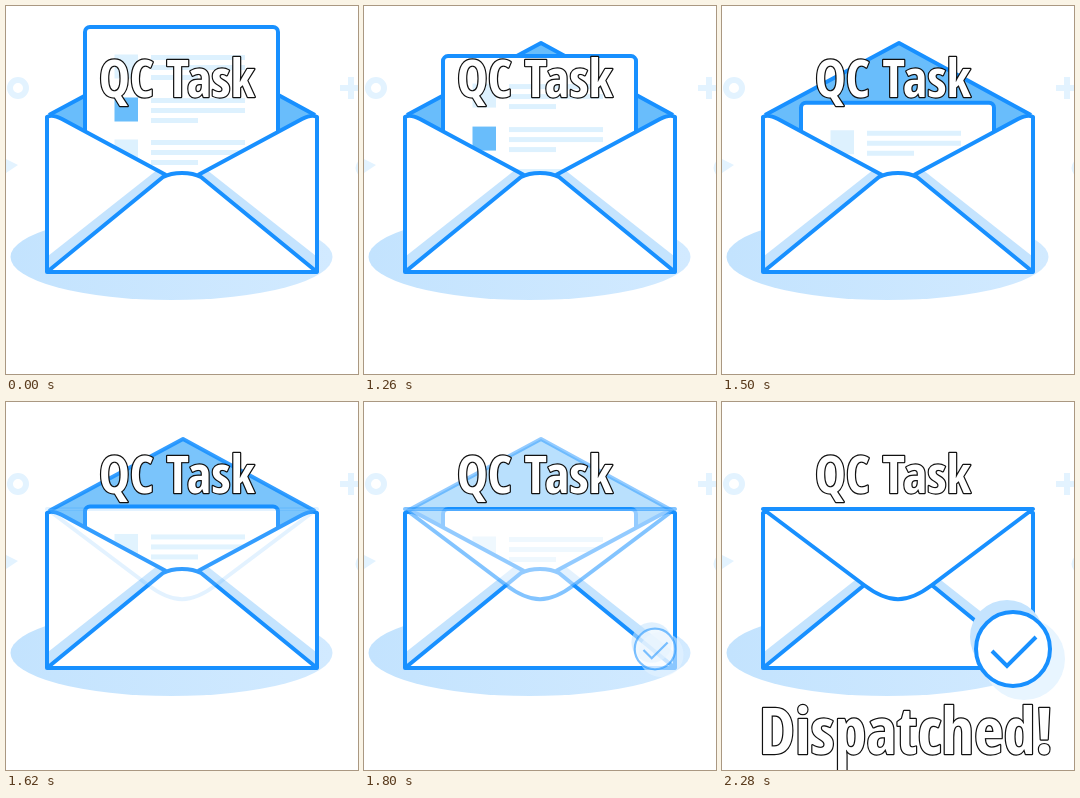
These frames come from a looping animation (352 px wide and 368 px high, 3.06 s). An HTML page with a canvas:

```html
<!DOCTYPE html>
<html lang="en">
<head>
<meta charset="utf-8">
<title>QC Task Dispatched!</title>
<style>
html, body { margin: 0; width: 100%; height: 100%; overflow: hidden; background: #fff; }
canvas { display: block; width: 352px; height: 368px; }
</style>
</head>
<body>
<canvas></canvas>
<script>
const W = 352, H = 368, LOOP = 3060, STEP = 60;
const BLUE = '#1890ff', SKY = '#69bdfb', BAND = '#c5e4fe', PALE = '#e3f3ff', LINE = '#ddf1fe';
const canvas = document.querySelector('canvas');
const ctx = canvas.getContext('2d');
const dpr = window.devicePixelRatio || 1;
canvas.width = W * dpr;
canvas.height = H * dpr;

const clamp = x => Math.min(1, Math.max(0, x));
const ramp = (t, start, length) => clamp((t - start) / length);

// cubic-bezier(.25, .1, .25, 1), solved by bisection
function ease(x) {
  const curve = (u, a, b) => 3 * u * (1 - u) ** 2 * a + 3 * u * u * (1 - u) * b + u ** 3;
  let lo = 0, hi = 1;
  for (let i = 0; i < 24; i++) {
    const mid = (lo + hi) / 2;
    if (curve(mid, .25, .25) < x) lo = mid; else hi = mid;
  }
  return curve(lo, .1, 1);
}

function shape(d, fill, stroke, width = 4) {
  const path = new Path2D(d);
  if (fill) { ctx.fillStyle = fill; ctx.fill(path); }
  if (stroke) { ctx.strokeStyle = stroke; ctx.lineWidth = width; ctx.stroke(path); }
}

function disc(x, y, r, fill, stroke, width = 4) {
  const path = new Path2D();
  path.arc(x, y, r, 0, 7);
  shape(path, fill, stroke, width);
}

function mirrored(draw) {
  draw();
  ctx.save();
  ctx.translate(W, 0);
  ctx.scale(-1, 1);
  draw();
  ctx.restore();
}

const font = (face, size) => `900 extra-condensed ${size}px "${face}", sans-serif`;

// Natural size of a text at 100px
function measure(face, text) {
  ctx.font = font(face, 100);
  return { face, width: ctx.measureText(text).width, cap: ctx.measureText('H').actualBoundingBoxAscent };
}

// Largest size that fits the box, in the most condensed face at hand
function caption(text, x, y, width, height) {
  const best = ['Noto Sans', 'Open Sans', 'Roboto', 'Open Sans Condensed', 'Roboto Condensed']
    .map(face => measure(face, text))
    .sort((a, b) => a.width / a.cap - b.width / b.cap)[0];
  const scale = Math.min(width / best.width, height / best.cap);
  const style = font(best.face, 100 * scale);
  const base = y + best.cap * scale / 2;
  return () => {
    ctx.font = style;
    ctx.textAlign = 'center';
    ctx.lineWidth = 2.4;
    ctx.strokeStyle = '#111';
    ctx.fillStyle = '#fff';
    ctx.strokeText(text, x, base);
    ctx.fillText(text, x, base);
  };
}

const title = caption('QC Task', 171, 72, 156, 40);
const done = caption('Dispatched!', 184, 329, 294, 48);

function backdrop() {
  disc(12, 82, 8, null, PALE, 6);
  disc(359, 162, 7, null, PALE, 5);
  shape('M334 82H356M345 71V93', null, PALE, 6);
  shape('M0 153L12 159L0 167Z', PALE);
  const glow = ctx.createLinearGradient(5, 0, 326, 0);
  glow.addColorStop(0, '#c3e3fe');
  glow.addColorStop(1, '#d2eaff');
  ctx.fillStyle = glow;
  ctx.beginPath();
  ctx.ellipse(165.5, 251, 161, 43, 0, 0, 7);
  ctx.fill();
}

function letter(top) {
  ctx.save();
  ctx.beginPath();
  ctx.rect(0, 0, W, 200);
  ctx.clip();
  ctx.translate(0, top);
  const sheet = new Path2D();
  sheet.roundRect(79, 0, 193, 190, 5);
  shape(sheet, '#fff', BLUE);
  [28, 71, 113].forEach((y, i) => {
    ctx.fillStyle = i === 1 ? SKY : LINE;
    ctx.fillRect(108.5, y - .5, 23.5, 24);
    ctx.fillStyle = LINE;
    [94, 94, 47].forEach((w, row) => ctx.fillRect(145, y + row * 10, w, 5));
  });
  ctx.restore();
}

function pocket() {
  const rim = 'M41 111Q46 108 56 113L160 169Q176 163 192 169L296 113Q306 108 311 111V266H41Z';
  shape(rim, '#fff');
  mirrored(() => shape('M42 250L151 164L160 169L157 171L42 265Z', BAND));
  mirrored(() => shape('M160 169L56 113Q46 108 41 111V266', null, BLUE));
  shape('M41 266L157 171C167 165.5 185 165.5 195 171L311 266Z', '#fff', BLUE);
}

function badge(p) {
  if (p <= 0) return;
  ctx.save();
  ctx.globalAlpha = p;
  ctx.translate(291, 247);
  ctx.scale(p, p);
  disc(11, 10, 41, '#e8f5ff');
  disc(-6, -12, 37, BAND);
  disc(0, 0, 37, '#fff', BLUE);
  ctx.lineCap = 'butt';
  ctx.lineJoin = 'miter';
  shape('M-21 2L-6 17L23 -12', null, BLUE);
  ctx.restore();
}

function draw(t) {
  const close = ramp(t, 1570, 430);
  ctx.setTransform(dpr, 0, 0, dpr, 0, 0);
  ctx.lineJoin = 'round';
  ctx.fillStyle = '#fff';
  ctx.fillRect(0, 0, W, H);
  backdrop();

  shape('M41 107H311V266H41Z', '#fff');
  shape('M43 108H309L176 180Z', SKY);
  ctx.globalAlpha = 1 - close;
  shape('M43 109L177 37L309 109', SKY, BLUE);
  ctx.globalAlpha = 1;

  letter(21 + 86 * ease(ramp(t, 1120, 640)));
  pocket();

  ctx.globalAlpha = close;
  shape('M41 107L142 183C167 202 185 202 210 183L311 107Z', '#fff', BLUE);
  ctx.globalAlpha = 1;

  badge(ease(ramp(t, 1660, 440)));
  title();
  if (t >= 1980) done();
}

let start;
function tick(now) {
  start ??= now;
  draw(Math.floor((now - start) % LOOP / STEP) * STEP);
  requestAnimationFrame(tick);
}
requestAnimationFrame(tick);
</script>
</body>
</html>
```
